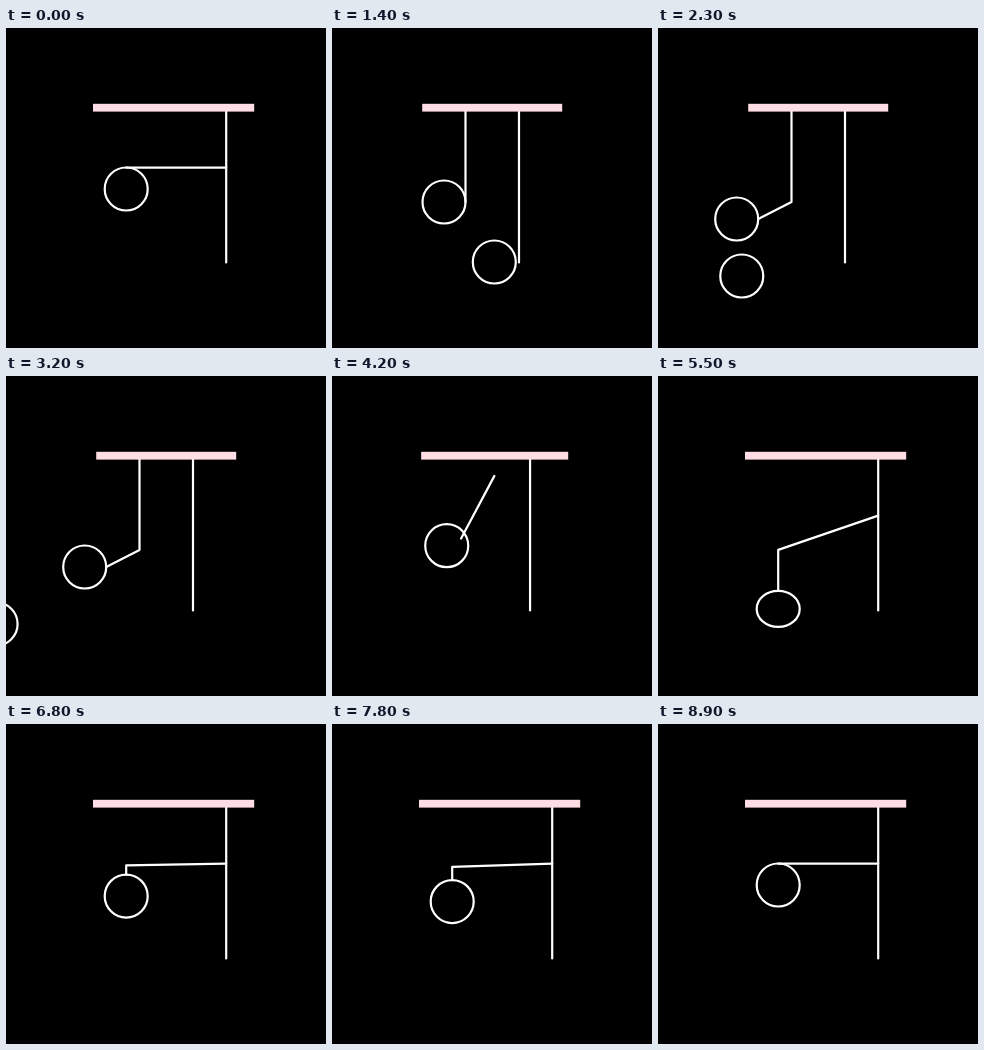
Recreate the animation shown at these times as an HTML page with a canvas. Size 320 by 320 pixels, loop 10 s.

```html
<!DOCTYPE html>
<html>
<head>
<meta charset="utf-8">
<style>
html, body { margin: 0; height: 100%; overflow: hidden; background: #000; }
canvas { display: block; width: 100vw; height: 100vh; }
</style>
</head>
<body>
<canvas id="stage" width="320" height="320"></canvas>
<script>
const ctx = document.getElementById('stage').getContext('2d');
const LOOP = 10000, STEP = 100, R = 21.5;
const BOUNCE_START = 4800, BOUNCE_END = 8900, BOUNCE = 1025;

const span = (t, a, b) => Math.min(1, Math.max(0, (t - a) / (b - a)));
const mix = (a, b, u) => a + (b - a) * u;
const ease = u => (1 - Math.cos(Math.PI * u)) / 2;

function path(...pts) {
  ctx.beginPath();
  pts.forEach(([x, y]) => ctx.lineTo(x, y));
  ctx.stroke();
}

function ring(x, y, ry = R) {
  ctx.beginPath();
  ctx.ellipse(x, y, R, ry, 0, 0, 2 * Math.PI);
  ctx.stroke();
}

// Ball dropping on its thread, squashing, then snapping back up
function bounce(t) {
  if (t <= BOUNCE_START || t >= BOUNCE_END) return { drop: 0, squash: 0 };
  const p = (t - BOUNCE_START) % BOUNCE / BOUNCE;
  return {
    drop: p < 0.676 ? span(p, 0, 0.4) ** 1.5 : 1 - span(p, 0.676, 1),
    squash: ease(span(p, 0.4, 0.68)) - ease(span(p, 0.68, 0.85))
  };
}

// Second ball: splits off, settles at the stem, then rolls away to the left
function roller(t) {
  const split = span(t, 100, 1000);
  const x = mix(120, 165.5, split) - 188 * ease(span(t, 1200, 3600));
  const y = mix(161, 250, ease(split))
    - 16 * ease(span(t, 1000, 1400)) + 14 * ease(span(t, 1400, 2000));
  ring(x, y);
}

function draw(t) {
  const m = span(t, 100, 1000) - span(t, 3900, 4800);
  const pull = span(t, 1400, 2300) - span(t, 3200, 3900);
  const { drop, squash } = bounce(t);

  ctx.fillStyle = '#000';
  ctx.fillRect(0, 0, 320, 320);
  ctx.strokeStyle = '#fff';
  ctx.lineWidth = 2.2;
  ctx.lineCap = ctx.lineJoin = 'round';

  const stem = mix(220.2, 187, m);
  path([stem, 80], [stem, 234.5]);

  const knot = [mix(120.2, 133.5, m), mix(139.6, 174, m) + 35.5 * drop ** 1.6];
  const cx = mix(120.2, 112, m) - 33.3 * pull;
  const cy = mix(161, 174, m) + 17 * pull + 73.5 * drop;
  const ry = R - 3.5 * squash;
  const thread = [[mix(220.2, 133.5, m), mix(139.6, 80, m)], knot];
  if (pull > 0) thread.push([cx + R, cy]);
  if (drop > 0) thread.push([cx, cy - ry]);
  path(...thread);
  ring(cx, cy, ry);
  if (t > 100 && t < 3600) roller(t);

  const left = mix(87, 90.2, m);
  ctx.fillStyle = '#ffdde4';
  ctx.fillRect(left, 75.8, mix(248.2, 230.2, m) - left, 7.8);
}

function tick(now) {
  draw(Math.floor(now % LOOP / STEP) * STEP);
  requestAnimationFrame(tick);
}
tick(0);
</script>
</body>
</html>
```
